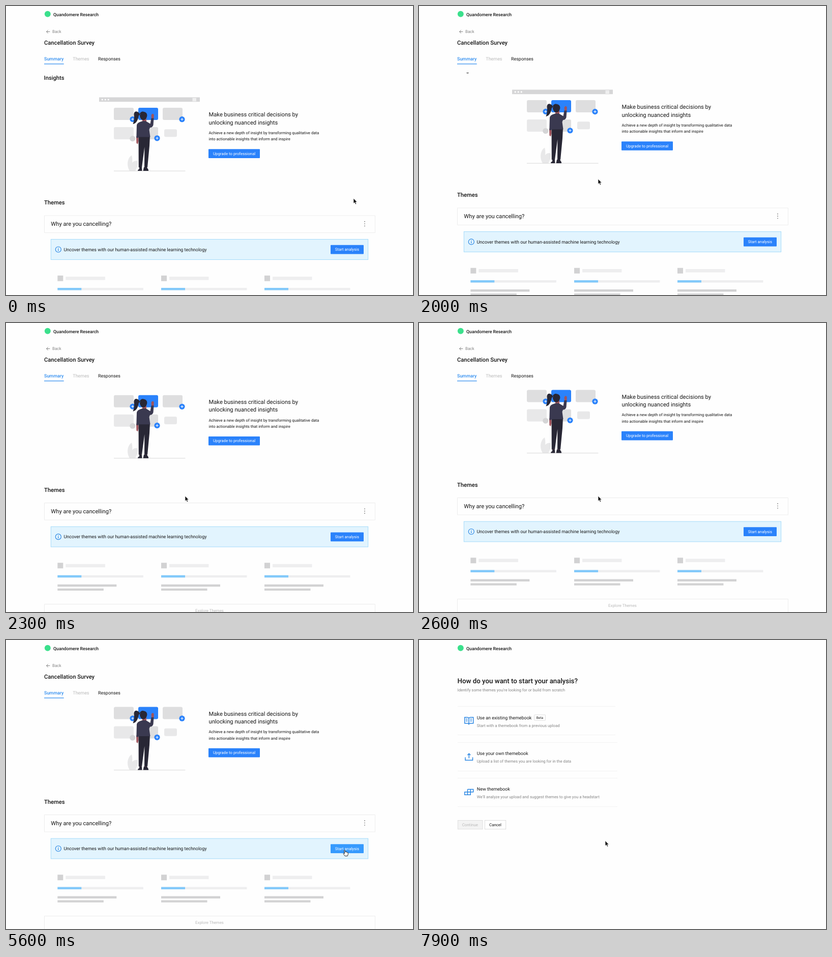
Recreate the animation shown at these times as an HTML page. Size 800 by 568 pixels, loop 8000 ms.

```html
<!DOCTYPE html>
<html lang="en">
<head>
<meta charset="utf-8">
<title>Start analysis</title>
<style>
  html, body { margin: 0; width: 100%; height: 100%; overflow: hidden; background: #fefefe; }
  svg { display: block; width: 800px; height: 568px; }
  text { font: 8.95px Roboto, sans-serif; fill: #161616; text-rendering: geometricPrecision; }
  .small { font-size: 7.84px; }
  .body { font-size: 7.78px; }
  .large { font-size: 11.2px; }
  .title { font-size: 13.3px; }
  .medium { font-weight: 500; }
  .mid { text-anchor: middle; }
  .grey { fill: #858585; }
  .pale { fill: #b9b9b9; }
  .white { fill: #fff; }
  .blue { fill: #2a82fb; }
  .rule { fill: none; stroke: #e9e9e9; stroke-width: .8; }
  .faint { fill: none; stroke: #f3f3f3; stroke-width: 1; }
  .icon { fill: none; stroke: #2b87e3; stroke-width: 1.5; }
  .skin { fill: #a0545c; }
  .dark { fill: #282735; }
  .shirt { fill: #3a3950; }
</style>
</head>
<body>
<svg viewBox="0 0 800 568">
  <defs>
    <clipPath id="below"><rect y="131" width="800" height="437"/></clipPath>
    <g id="plus">
      <circle r="5.6" class="blue"/>
      <path d="M-2.6 0H2.6M0-2.6V2.6" stroke="#fff" stroke-width="1.1"/>
    </g>
    <g id="skeleton">
      <path d="M0 529.7h11v11H0zM0 572h116v4.5H0zM0 580h90.5v4.3H0z" fill="#d2d2d3"/>
      <path d="M16 532h77.5v6.5H16zM0 554h168.5v4.6H0z" fill="#eeeeef"/>
      <path d="M0 554h47v4.6H0z" fill="#82c9fa"/>
    </g>
  </defs>

  <circle cx="81.8" cy="15.8" r="6" fill="#3be08c"/>
  <text x="93" y="20" class="medium" style="font-size:8.75px">Quandomere Research</text>

  <g id="survey">
    <path d="M86.3 50.5H79.7M82.7 47.3 79.5 50.5 82.7 53.7" fill="none" stroke="#777" stroke-width=".9"/>
    <text x="91" y="53.3" class="grey" style="font-size:8px">Back</text>
    <text x="75" y="76.2" class="large medium">Cancellation Survey</text>
    <text x="75" y="106.6" class="medium" style="fill:#2f8df0">Summary</text>
    <text x="131.3" y="106.6" class="pale">Themes</text>
    <text x="181" y="106.6">Responses</text>
    <path d="M75 113.3h38.7v1.3H75z" fill="#2f8df0"/>

    <g clip-path="url(#below)"><g id="scroller">
      <text x="74.5" y="145" class="large medium">Insights</text>

      <path d="M183 179.6h198v8.6H183z" fill="#d6d6d7"/>
      <path d="M189.2 184h.01M195.2 184h.01M201.2 184h.01" stroke="#fff" stroke-width="3.2" stroke-linecap="round"/>
      <path d="M366.500 181.700h7.500M366.500 184h7.500M366.500 186.300h7.500" stroke="#fff" stroke-width="1.300"/>
      <g fill="#dededf">
        <rect x="212" y="200" width="39" height="24" rx="3"/>
        <rect x="308" y="200" width="39" height="24" rx="3"/>
        <rect x="260" y="238" width="39" height="24" rx="3"/>
        <g fill="#e8e8e9">
          <rect x="212" y="238" width="39" height="24" rx="3"/>
          <rect x="311" y="242.3" width="25" height="15" rx="3"/>
          <path d="M243 324C236 313 239 298 247 293.500Q249 300 248 308Q252 303 259 304.500Q260 315 254 324z"/>
        </g>
      </g>
      <rect x="260" y="200" width="39" height="24" rx="3" class="blue"/>
      <circle cx="248.800" cy="260.600" r="5.600" fill="#d5d5d6"/>
      <use href="#plus" x="249" y="222.5"/>
      <use href="#plus" x="346" y="222.7"/>
      <use href="#plus" x="297" y="259.8"/>
      <path d="M212 324.200H352.500" stroke="#cfcfcf" stroke-width=".8"/>

      <path class="skin" d="M268 219h8v10h-8zM286 221 285.500 214 288.300 211.500 290.800 213.500 290.500 221.500zM256 256h4l.5 9-1.500 6.500-2.600-2zM262 315h4v5h-4zM273 315h4v5h-4z"/>
      <path class="dark" d="M264 214C260 205 251 205 251.500 214Q253 224 249.500 232C257 231 260 222 261 215zM263 216C262 209 267 206.500 271 208C277 209 279 214 276 220Q274 225 268 224Q264 222 263 216zM260.500 255h22.500l-1 20-4 42h-6l.3-40-5.300 40H260.800z"/>
      <path class="shirt" d="M266 227Q272 225 277 227.500L283.500 231.500 285.500 220.500H290.500L289.500 234Q288 239 283 239L281.500 243 283.500 257.500H260.800L260 259H256.300L257 234Q258 229 266 227z"/>
      <path class="dark" d="M262 317h5l.500 7H259q0-2.500 3-3.500zM271 317h6l3 5v2h-10.500z"/>

      <text x="398.500" y="217" class="large">Make business critical decisions by</text>
      <text x="398.500" y="232.700" class="large">unlocking nuanced insights</text>
      <text x="398.500" y="251.900" class="body">Achieve a new depth of insight by transforming qualitative data</text>
      <text x="398.500" y="264.100" class="body">into actionable insights that inform and inspire</text>
      <rect x="398" y="281.300" width="101" height="17.600" rx="1" class="blue"/>
      <text x="448.500" y="292.800" class="small mid white">Upgrade to professional</text>

      <text x="75" y="390" class="large medium">Themes</text>
      <path class="rule" d="M75.500 412H725.500V445.500H75.500z"/>
      <text x="88.300" y="432" class="large">Why are you cancelling?</text>
      <path d="M705 423.700h.01M705 428h.01M705 432.300h.01" stroke="#666" stroke-width="1.700" stroke-linecap="round"/>

      <rect x="88.300" y="458.600" width="623.400" height="39.800" fill="#e2f4fe" stroke="#9bd8fa" stroke-width=".9"/>
      <circle cx="102.800" cy="478.500" r="5.500" class="icon" style="stroke-width:1.200"/>
      <path d="M102.800 477.500V481.500M102.800 475.300V476.500" class="icon" style="stroke-width:1.200"/>
      <text x="113.500" y="481.600">Uncover themes with our human-assisted machine learning technology</text>
      <rect id="start" x="638" y="469.800" width="65" height="17.700" rx="1"/>
      <text x="670.400" y="481.400" class="small mid white">Start analysis</text>

      <use href="#skeleton" x="101.300"/>
      <use href="#skeleton" x="305"/>
      <use href="#skeleton" x="508"/>
      <path class="rule" d="M75.500 637V611H725.500V637"/>
      <text x="400" y="626.800" class="small mid pale">Explore Themes</text>
    </g></g>
  </g>

  <g id="chooser">
    <text x="75.500" y="84.500" class="title medium">How do you want to start your analysis?</text>
    <text x="75.500" y="100.800" class="small grey">Identify some themes you’re looking for or build from scratch</text>
    <path class="faint" d="M76 130.500H386M76 186.500H386M76 201.500H390M76 257.500H390M76 271.500H390M76 327.500H390"/>

    <path class="icon" d="M98 153.500V165.500M98 153.500Q97 152 94.500 152H89.800V163.800H95Q97.300 163.800 98 165.500Q98.700 163.800 101 163.800H106.700V152H101.500Q99 152 98 153.500M92 155.500h3.500M92 159h3.500M100.500 155.500h3.500M100.500 159h3.500"/>
    <text x="113.800" y="155.600">Use an existing themebook</text>
    <rect x="226.500" y="147" width="22" height="11" rx="1" fill="none" stroke="#d6d6d6" stroke-width=".8"/>
    <text x="237.400" y="154.800" class="mid" style="font-size:6.500px">Beta</text>
    <text x="113.800" y="170.500" class="small grey">Start with a themebook from a previous upload</text>

    <path class="icon" d="M91 230.500V236.300H105.500V230.500M98.300 232.500V223.500M95.300 226.200 98.300 223.200 101.300 226.200"/>
    <text x="113.800" y="226.100">Use your own themebook</text>
    <text x="113.800" y="241" class="small grey">Upload a list of themes you are looking for in the data</text>

    <path class="icon" d="M95.500 293.500H106.700V298.800H89.800V304.200H101.200V293.500M95.500 293.500V304.200M106.700 293.500V298.800"/>
    <text x="113.800" y="296">New themebook</text>
    <text x="113.800" y="310.900" class="small grey">We’ll analyze your upload and suggest themes to give you a headstart</text>

    <rect x="76.300" y="354.500" width="48.700" height="17.300" fill="#f3f3f3" stroke="#d9d9d9" stroke-width=".8"/>
    <text x="100.300" y="366" class="small mid pale">Continue</text>
    <rect x="129.300" y="354.500" width="41.400" height="17.300" fill="#fff" stroke="#d4d4d4" stroke-width=".8"/>
    <text x="150" y="366" class="small mid">Cancel</text>
  </g>

  <g id="cursor">
    <path id="arrow" d="M0 0V10.200L2.300 8.100 3.900 11.800 5.700 11 4.100 7.400H7.200z" fill="#111" stroke="#fff" stroke-width=".7"/>
    <path id="hand" d="M-.900 .800Q0-.600 .900 .800L1.600 4.300 2.600 3.800 3.500 4.500 4.500 4.200 5.300 5 6.500 5.200 7 8.300 5.700 12H.700L-2.200 8Q-2.500 6.300-1 6.500L.200 7.500z" fill="#fff" stroke="#111" stroke-width=".9" stroke-linejoin="round"/>
  </g>
</svg>
<script>
  const LOOP = 8000, STEP = 100, HOVER = 3400, PAGE_CHANGE = 5900;
  const $ = id => document.getElementById(id);

  // Eased progress from 0 to 1 between two times.
  const ease = (t, from, to) => {
    const p = Math.min(1, Math.max(0, (t - from) / (to - from)));
    return p * p * (3 - 2 * p);
  };

  // Pointer moves: start time, end time, destination x and y.
  const origin = [683, 378];
  const moves = [
    [400, 1700, 352, 340],
    [2700, 3550, 661, 414.500],
    [4200, 5400, 665.500, 412.500],
    [6750, 7400, 393, 406],
    [7600, 7900, 366, 394.500]
  ];

  function pointer(t) {
    let [x, y] = origin;
    for (const [from, to, toX, toY] of moves) {
      const p = ease(t, from, to);
      x += (toX - x) * p;
      y += (toY - y) * p;
    }
    return [x, y];
  }

  const show = (id, on) => $(id).style.display = on ? '' : 'none';

  function draw(now) {
    const t = Math.floor(now % LOOP / STEP) * STEP;
    const chosen = t >= PAGE_CHANGE;
    const hovering = t >= HOVER && !chosen;
    const glow = ease(t, 3550, 3900);

    show('survey', !chosen);
    show('chooser', chosen);
    show('arrow', !hovering);
    show('hand', hovering);
    $('scroller').setAttribute('transform', `translate(0 ${-68.5 * ease(t, 1800, 2460)})`);
    $('start').setAttribute('fill', `rgb(${42 + 12 * glow},${130 + 24 * glow},${251 + 3 * glow})`);
    $('cursor').setAttribute('transform', `translate(${pointer(t)})`);
    requestAnimationFrame(draw);
  }
  requestAnimationFrame(draw);
</script>
</body>
</html>
```
